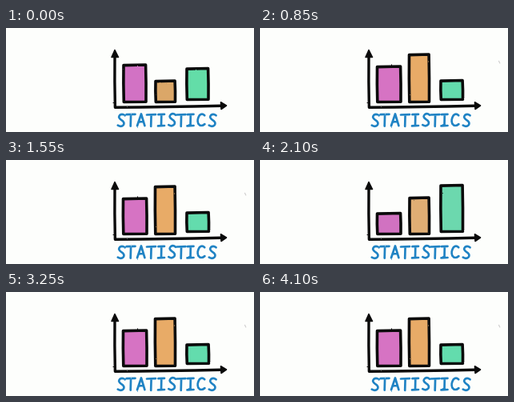
Write an HTML page that moves like this. It is 310 px wide and 130 px high and loops after 4200 ms.

```html
<!DOCTYPE html>
<html lang="en">
<head>
<meta charset="utf-8">
<title>Statistics</title>
<style>
  html, body { margin: 0; width: 100%; height: 100%; overflow: hidden; background: #fdfefc; }
  svg { display: block; width: 100vw; height: 100vh; }
  .ink { fill: none; stroke: #0b0b0b; stroke-width: 3.4; stroke-linecap: round; stroke-linejoin: round; }
  .tip { fill: #0b0b0b; stroke: #0b0b0b; stroke-width: 1.6; stroke-linejoin: round; }
  .bar { stroke: #0b0b0b; stroke-width: 3.6; stroke-linejoin: round; }
  .word { fill: none; stroke: #2083c4; stroke-width: 2.7; stroke-linecap: round; stroke-linejoin: round; }
</style>
</head>
<body>
<svg viewBox="0 0 310 130" role="img" aria-label="STATISTICS">
  <defs>
    <filter id="rough" filterUnits="userSpaceOnUse" x="0" y="0" width="310" height="130" color-interpolation-filters="sRGB">
      <feTurbulence type="fractalNoise" baseFrequency="0.22" numOctaves="2" seed="4"/>
      <feDisplacementMap in="SourceGraphic" scale="1.6" xChannelSelector="R" yChannelSelector="G"/>
    </filter>
  </defs>
  <g filter="url(#rough)">
    <g id="bars"></g>
    <path class="ink" d="M136 35Q135.6 66 136.4 99.3Q200 99 269 97.3"/>
    <path class="tip" d="M136 27.5L132 36.5L140.5 36.5Z M275.5 97L268.5 92.8L269 101.5Z"/>
    <g id="word" class="word"></g>
  </g>
  <path id="speck" d="M298.6 41.4l1.2 2.6" stroke="#cfcfcf" stroke-width="1.2" stroke-linecap="round"/>
</svg>
<script>
const LOOP = 4200, HOLD = 800;
const SVG = 'http://www.w3.org/2000/svg';
const $ = id => document.getElementById(id);

// Outline centre lines: left, top, right, bottom.
const POSES = [
  { fills: ['#d272c4', '#dba768', '#63dda8'],
    bars: [[147, 46, 175, 92.5], [187, 66, 211.5, 92.5], [226, 50.5, 253, 89.5]] },
  { fills: ['#d673c3', '#e8ab67', '#63dcad'],
    bars: [[146.5, 48, 176, 92.5], [186.5, 33, 211.5, 92.5], [226, 65.5, 253.5, 89.5]] },
  { fills: ['#d172c1', '#e0ae74', '#6cd8ae'],
    bars: [[146.5, 66.5, 176, 92.5], [187, 47, 211.5, 92.5], [226, 31.5, 253.5, 89.5]] }
];

const LETTERS = {
  S: 'M9 2Q6 -.6 3 1.4Q-.2 4.5 4.5 7.5Q9.5 10.5 7.2 14Q4.5 17 .3 14.4',
  T: 'M0 1.2L11 .8M5.6 1.2L5.2 15.6',
  A: 'M0 15.6L5 .8L9.4 15.4M2 10.6L7.8 10.3',
  I: 'M.4 1.2L8 .8M4.3 1.2L4 15.2M0 15.4L8 15',
  C: 'M9.2 2.6Q6 -.6 2.8 2.6Q-.8 8 1.4 13Q4.6 17.4 9.4 13.4'
};
const STARTS = [139.5, 150.5, 164, 176, 190, 203, 213.5, 226.5, 239, 253.5];

function add(parent, cls, d) {
  const path = document.createElementNS(SVG, 'path');
  path.setAttribute('class', cls);
  path.setAttribute('d', d);
  parent.appendChild(path);
  return path;
}

function box([l, t, r, b]) {
  const mid = (t + b) / 2;
  return `M${l} ${t + .6}L${r - .4} ${t}Q${r + .3} ${mid} ${r} ${b - .3}` +
         `L${l + .3} ${b}Q${l - .4} ${mid} ${l} ${t + .6}Z`;
}

[...'STATISTICS'].forEach((ch, i) => {
  add($('word'), '', LETTERS[ch])
    .setAttribute('transform', `translate(${STARTS[i]} ${107.3 - (i % 3) * .3})`);
});

const bars = [0, 1, 2].map(() => add($('bars'), 'bar', ''));
let shown = -1;

function draw(time) {
  const t = time % LOOP;
  // The second step stays up until the loop closes.
  const pose = Math.min(Math.floor(t / HOLD), 4) % 3;
  if (pose !== shown) {
    shown = pose;
    const { fills, bars: sizes } = POSES[pose];
    bars.forEach((bar, i) => {
      bar.setAttribute('d', box(sizes[i]));
      bar.setAttribute('fill', fills[i]);
    });
    $('speck').style.visibility = pose === 1 ? 'visible' : 'hidden';
  }
}

const start = performance.now();
function tick(now) {
  draw(Math.max(0, now - start));
  requestAnimationFrame(tick);
}
draw(0);
requestAnimationFrame(tick);
</script>
</body>
</html>
```
